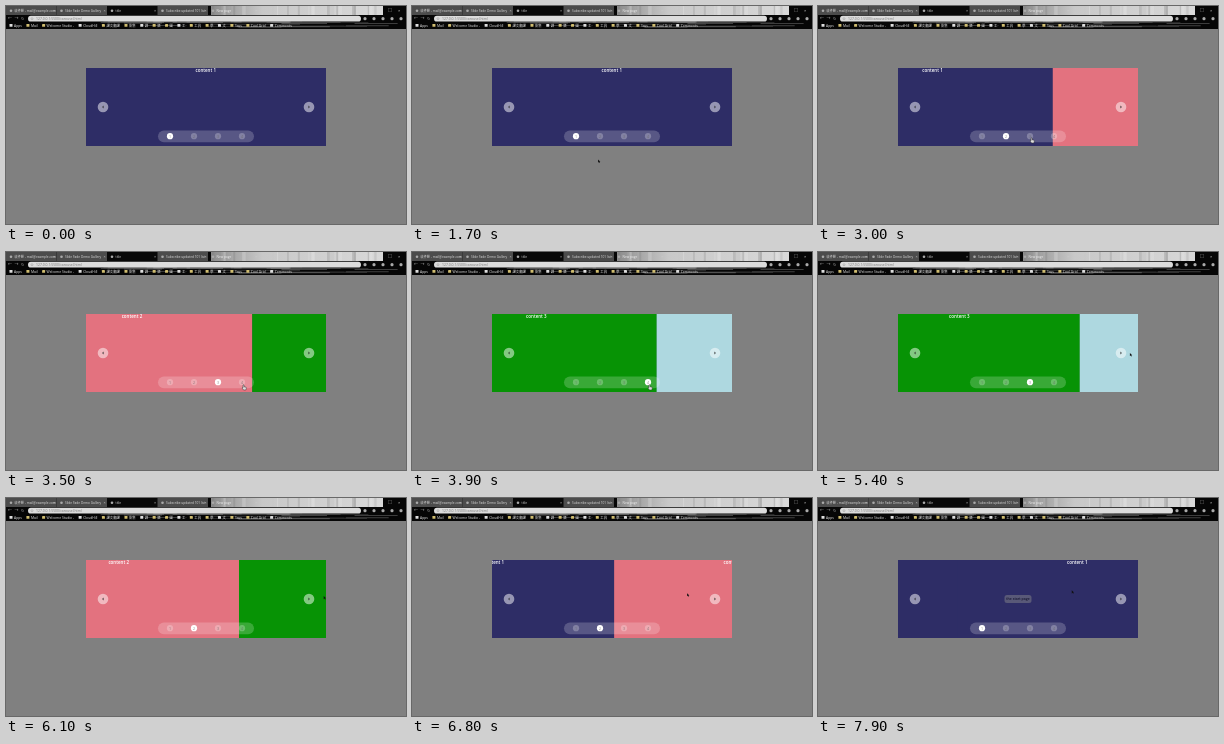
An HTML page that plays this animation: 400 px wide and 218 px high, repeating every 8000 ms.

```html
<!DOCTYPE html>
<html lang="en">
<head>
<meta charset="utf-8">
<title>Carousel</title>
<style>
  html, body { margin: 0; width: 100%; height: 100%; overflow: hidden; background: #808080; }
  svg { display: block; width: 400px; height: 218px; }
  text { font-family: "Open Sans", "Noto Sans CJK TC", "Noto Sans CJK", sans-serif; }
</style>
</head>
<body>
<svg id="stage" viewBox="0 0 400 218" xmlns="http://www.w3.org/2000/svg">
  <defs>
    <clipPath id="view"><rect x="80" y="62" width="240" height="78"/></clipPath>
    <linearGradient id="shine">
      <stop offset="0" stop-color="#8c8c8c"/>
      <stop offset=".3" stop-color="#c8c8c8"/>
      <stop offset="1" stop-color="#d8d8d8"/>
    </linearGradient>
  </defs>
</svg>
<script>
const LOOP = 8000, LEFT = 80, TOP = 62, WIDTH = 240, HEIGHT = 78, GLIDE = 800;
const COLORS = ["#2e2d66", "#e3727f", "#079305", "#aed8e0"];
const stage = document.getElementById("stage");
const dotX = i => 164 + 24 * i;

function add(parent, tag, attrs, label) {
  const node = document.createElementNS("http://www.w3.org/2000/svg", tag);
  for (const key in attrs) node.setAttribute(key, attrs[key]);
  if (label) node.textContent = label;
  parent.appendChild(node);
  return node;
}
const rect = (p, x, y, width, height, fill, more) => add(p, "rect", { x, y, width, height, fill, ...more });
const circle = (p, cx, cy, r, fill, more) => add(p, "circle", { cx, cy, r, fill, ...more });
const write = (p, x, y, size, fill, label, more) => add(p, "text", { x, y, "font-size": size, fill, ...more }, label);
const middle = { "text-anchor": "middle" };

function seeded(seed) {
  return () => (seed = (seed * 16807) % 2147483647) / 2147483647;
}

function drawTheme(g) {
  const random = seeded(41);
  rect(g, 0, 0, 400, 23, "#060606");
  rect(g, 205, 0, 172, 9, "url(#shine)");
  for (let i = 0; i < 24; i++) {
    rect(g, 206 + random() * 166, 0, 1 + random() * 3, 9, random() < 0.5 ? "#fff" : "#777", { opacity: random() * 0.3 });
  }
  for (let i = 0; i < 24; i++) {
    const length = 30 + random() * 80;
    rect(g, 90 + random() * (310 - length), 15.6 + random() ** 2 * 6, length, 0.5, "#fff", { opacity: 0.15 + random() * 0.35 });
  }
}

function drawTabs(g) {
  const labels = ["收件匣 - mail@example.com", "Slide Fade Demo Gallery", "title", "Subscribe updated 101 list", "New page"];
  labels.forEach((label, i) => {
    const x = 3 + i * 50.5;
    if (i < 4) rect(g, x - 3, 0, 50.5, 9, i === 2 ? "#080808" : "#4c4c4c");
    circle(g, x + 2, 4.8, 1.3, "#aaa");
    write(g, x + 5.5, 6.1, 3.2, i === 4 ? "#eee" : "#ddd", label);
    write(g, x + 44, 6.2, 3.8, "#ccc", "×");
  });
  ["–", "□", "×"].forEach((sign, i) => write(g, 372 + i * 10, 6.2, 4, "#ddd", sign));
}

function drawTools(g) {
  ["←", "→", "↻"].forEach((sign, i) => write(g, 2 + i * 6.5, 14.2, 4, "#aaa", sign));
  rect(g, 22, 9.8, 333, 5.8, "#dcdcdc", { rx: 2.9 });
  circle(g, 26, 12.7, 1, "none", { stroke: "#888", "stroke-width": 0.4 });
  write(g, 30, 14, 3.4, "#777", "127.0.0.1:5500/carousel.html");
  for (let x = 359; x < 400; x += 9) circle(g, x, 12.7, 1.6, "#aaa");

  const labels = "Apps,Mail,Welcome Studio -,CloudHill,譯文翻譯,影集,課,樂,圖,工,工具,學,文,Sass,Cool Grid,Comments";
  let x = 3.5;
  labels.split(",").forEach((label, i) => {
    rect(g, x, 18, 3, 2.8, i % 3 ? "#d0bd70" : "#ddd", { rx: 0.4 });
    x += write(g, x + 4.5, 20.8, 3.4, "#eee", label).getComputedTextLength() + 9;
  });
}

function drawCarousel() {
  const view = add(stage, "g", { "clip-path": "url(#view)" });
  rect(view, LEFT, TOP, WIDTH, HEIGHT, COLORS[0]);
  const track = add(view, "g", {});
  COLORS.forEach((color, i) => {
    const x = LEFT + i * WIDTH;
    rect(track, x, TOP, WIDTH + 0.2, HEIGHT, color);
    write(track, x + WIDTH / 2 - 0.3, 66.4, 4.5, "#fff", "content " + (i + 1), { ...middle, "font-weight": 600 });
  });

  [-1, 1].forEach(side => {
    const x = 200 + side * 103;
    circle(stage, x, 101, 5.3, "#fff", { opacity: 0.5 });
    add(stage, "path", { d: `M${x - side * 0.7} 99.5L${x + side} 101L${x - side * 0.7} 102.5Z`, fill: "#222", opacity: 0.75 });
  });

  rect(stage, 152, 124.4, 96, 11.8, "#fff", { rx: 5.9, opacity: 0.2 });
  const dots = COLORS.map((_, i) => {
    const dot = circle(stage, dotX(i), 130.2, 3.1, "#fff");
    write(stage, dotX(i), 131.5, 3.6, "#666", i + 1, { ...middle, opacity: 0.75 });
    return dot;
  });

  const toast = add(stage, "g", { opacity: 0 });
  rect(toast, 186.5, 97, 27, 8, "#777784", { rx: 2.5, opacity: 0.6 });
  write(toast, 200, 102.3, 3.5, "#161530", "the start page", { ...middle, "font-weight": 600 });
  return { track, dots, toast };
}

// cubic-bezier(.25, .1, .25, 1)
function ease(x) {
  let lo = 0, hi = 1;
  for (let i = 0; i < 24; i++) {
    const s = (lo + hi) / 2;
    if (0.75 * s - 0.75 * s * s + s ** 3 < x) lo = s; else hi = s;
  }
  return 0.3 * lo * (1 - lo) ** 2 + 3 * (1 - lo) * lo * lo + lo ** 3;
}

const clicks = [2820, 3314, 3683];
const drags = [
  { start: 4800, end: 5200, x: 177, travel: 141 },
  { start: 5650, end: 6000, x: 165, travel: 153 },
  { start: 6500, end: 6860, x: 143, travel: 158 },
  { start: 7500, end: 8000, x: 192, travel: 77 }
];

// Every click or release glides to a slide; a drag shifts the track with the pointer.
const moves = [
  ...clicks.map((at, i) => ({ at, goal: i + 1 })),
  ...drags.flatMap(({ start, end, travel }, i) => [
    { at: start, span: end - start, shift: travel / WIDTH },
    { at: end, goal: 2 - i }
  ])
];

function slideAt(time) {
  let pos = 0, active = 0;
  moves.forEach(({ at, goal, span, shift }, i) => {
    if (time < at) return;
    const next = moves[i + 1] ? moves[i + 1].at : LOOP;
    const passed = Math.min(time, next) - at;
    if (span) {
      pos -= shift * passed / span;
    } else {
      pos += (goal - pos) * ease(Math.min(1, passed / GLIDE));
      active = goal;
    }
  });
  return { pos, active };
}

const path = [
  { t: 100, x: 299, y: 112 }, { t: 800, x: 149, y: 109 }, { t: 1200, x: 186, y: 154 },
  ...clicks.flatMap((t, i) => [t - 320, t].map(t => ({ t, x: dotX(i + 1) + 1, y: 131 + i }))),
  ...drags.flatMap(({ start, end, x, travel }, i) => [
    { t: start, x, y: 102 - 3 * i },
    { t: end, x: x + travel, y: 101 - 3 * i, held: true }
  ])
];

// The pointer lingers before it leaves, except while it drags.
function pointerAt(time) {
  const i = Math.max(1, path.findIndex(p => p.t >= time));
  const a = path[i - 1], b = path[i];
  const part = Math.max(0, (time - a.t) / (b.t - a.t)) ** (b.held ? 1 : 4);
  return [a.x + (b.x - a.x) * part, a.y + (b.y - a.y) * part];
}

const browser = add(stage, "g", {});
drawTheme(browser);
drawTabs(browser);
drawTools(browser);
const { track, dots, toast } = drawCarousel();
const pointer = add(stage, "g", {});
const arrow = add(pointer, "path", { d: "M0 0V3.2L.8 2.5L1.3 3.6L1.8 3.4L1.4 2.3H2.3Z", fill: "#111" });
const hand = add(pointer, "path", {
  d: "M0 0Q.6-.6 1 0V1.7L3 2.2Q3.6 2.5 3.3 3.5L2.8 5H.6L-1 3Q-.8 2.2 0 2.8Z",
  fill: "#ddd", stroke: "#333", "stroke-width": 0.5
});

function draw(time) {
  const { pos, active } = slideAt(time);
  track.setAttribute("transform", `translate(${-pos * WIDTH} 0)`);
  dots.forEach((dot, i) => dot.setAttribute("opacity", i === active ? 1 : 0.25));
  toast.setAttribute("opacity", Math.max(0, Math.min(1, (time - 7600) / 200)));

  const [x, y] = pointerAt(time);
  const overDots = y > 126 && y < 137;
  pointer.setAttribute("transform", `translate(${x} ${y})`);
  pointer.setAttribute("opacity", time < 100 ? 0 : 1);
  arrow.setAttribute("opacity", overDots ? 0 : 1);
  hand.setAttribute("opacity", overDots ? 1 : 0);
}

const begin = performance.now();
function tick() {
  draw((performance.now() - begin) % LOOP);
  requestAnimationFrame(tick);
}
tick();
</script>
</body>
</html>
```
